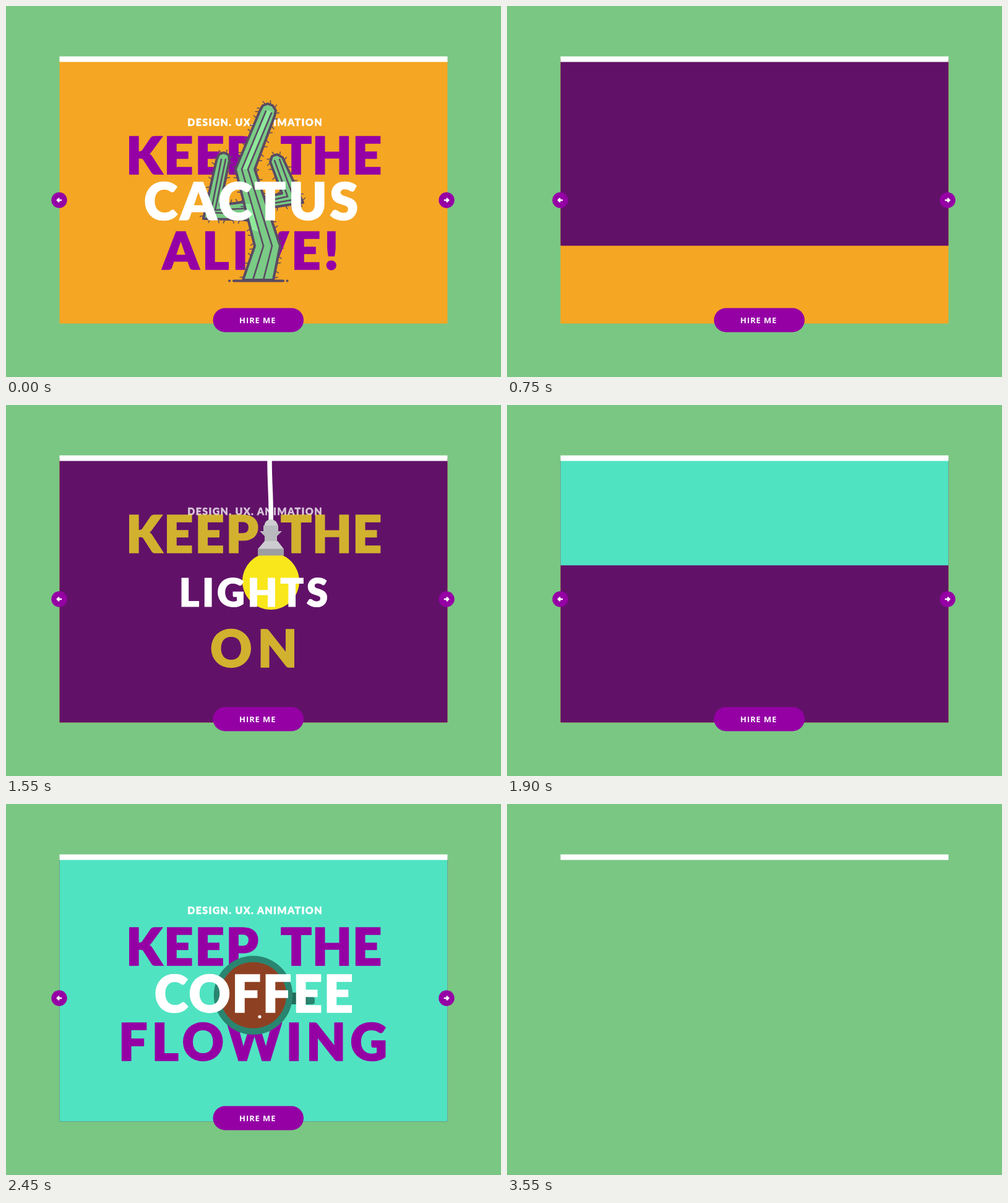
Recreate the animation shown at these times as an HTML page. Size 800 by 600 pixels, loop 3600 ms.

```html
<!DOCTYPE html>
<html lang="en">
<head>
<meta charset="utf-8">
<title>Keep it alive</title>
<style>
html, body { margin: 0; width: 100%; height: 100%; overflow: hidden; background: #7ac783; }
svg { display: block; width: 100%; height: 100%; color: #fff; }
text { font-family: Lato, "Open Sans", sans-serif; font-weight: 900; text-anchor: middle; fill: currentColor; }
.big { font-size: 83px; stroke: currentColor; stroke-width: 1.6px; }
.sub { font-size: 16px; stroke: currentColor; stroke-width: .4px; }
.hire { font: 700 13px "Open Sans", sans-serif; }
.violet { color: #9500a5; }
.gold { color: #f8e71c; }
.line { fill: none; stroke: #5a4a63; stroke-linejoin: round; stroke-linecap: round; }
</style>
</head>
<body>
<svg viewBox="0 0 800 600">
  <clipPath id="below"><rect x="86" y="86" width="628" height="428"/></clipPath>
  <rect class="panel" x="86.5" y="86" width="627" fill="#f5a623"/>
  <rect class="panel" x="86.5" y="86" width="627" fill="#611268"/>
  <rect class="panel" x="86.5" y="86" width="627" fill="#50e3c2"/>
  <g id="scenes"></g>
  <rect x="86.5" y="81.5" width="627" height="9" fill="#fff"/>
  <g id="buttons"></g>
</svg>
<script>
const $ = s => document.querySelector(s);
const LOOP = 3600, STEP = 50;
const clamp = v => Math.max(0, Math.min(1, v));
const ramp = (t, from, to) => clamp((t - from) / (to - from));

const word = (s, x, y, gap, cls = "big") =>
  `<text class="${cls}" x="${x + gap / 2}" y="${y}" letter-spacing="${gap}">${s}</text>`;
const line = (d, w) => `<path class="line" d="${d}" stroke-width="${w}"/>`;

// Short spines along the outer side of a clockwise outline
function spines(pts) {
  let d = "";
  for (let i = 1; i < pts.length; i++) {
    const [x, y] = pts[i - 1], dx = pts[i][0] - x, dy = pts[i][1] - y, len = Math.hypot(dx, dy);
    for (let s = 5, k = 0; s < len; s += 12, k++) {
      const lean = k % 2 ? 2.5 : -2.5, ux = dx / len, uy = dy / len;
      d += `M${x + ux * s} ${y + uy * s}l${uy * 6 + ux * lean} ${-ux * 6 + uy * lean}`;
    }
  }
  return line(d, 1.5);
}

function limb(outline, ribs, shine = "") {
  const pts = outline.split(" ").map(p => p.split(",").map(Number));
  return spines(pts) +
    `<path class="line" style="fill:#7acb85" d="M${outline}Z" stroke-width="4"/>` +
    `<path d="${shine}" fill="#8ee89a"/>` + line(ribs, 2.6);
}

const cactus =
  limb("395,346 319,344 340,250 344,240 352,237 360,241 361,250 346,322 392,316",
    "M348 248L331 334L395 337M355 248L338 330L395 327") +
  limb("405,312 446,303 427,252 430,243 438,240 447,245 480,318 415,328",
    "M434 250L455 308L415 317M442 248L466 313L415 322") +
  limb("383,443 402,388 371,264 410,170 415,161 423,158 431,161 436,169 434,178 402,264 443,388 432,443",
    "M420 170L381 264L416 388L399 443M429 173L391 264L430 388L416 443",
    "M420 168L430 171L391 264L381 264ZM387 320L397 320L410 366L398 362Z") +
  line("M368 444.5H448M361 444.5h.1M454.5 444.5h.1", 4);

const bulb = `
  <path d="M425 -200L426 90C426 130 429 150 428 190" fill="none" stroke="#fff" stroke-width="7.5"/>
  <circle cx="428" cy="285" r="46" fill="#f9e71c"/>
  <path d="M417 196Q419 185 428 185Q437 185 440 196Z" fill="#cdcdd0"/>
  <path d="M416 195H440V204H446L438 212V221H418V212L410 204H416Z" fill="#b9babd"/>
  <path d="M418 220H439L449 233H407Z" fill="#cdcdd0"/>
  <path d="M407 232.5H449V243.5H407Z" fill="#9d9ea1"/>`;

const cup = `
  <rect x="455" y="305" width="36" height="19" fill="#216b5a"/>
  <rect x="486" y="312" width="13" height="12" rx="4" fill="#2a8570"/>
  <circle cx="399.5" cy="309.3" r="63.7" fill="#2a8570"/>
  <circle cx="399.5" cy="309.3" r="53.5" fill="#8e4122"/>
  <circle cx="424" cy="324.5" r="3" fill="#fff"/>
  <circle cx="410" cy="344" r="2.6" fill="#fff"/>`;

// enter/dur: arrival, leave: start of departure; sub, top, mid, low are baselines
const scenes = [
  { enter: -900, dur: 300, leave: 400, hue: "violet", sub: 193.5, top: 272, mid: 345.5, low: 425.5,
    name: ["CACTUS", 396, 4.4], end: ["ALIVE!", 395.5, 5.2], art: cactus, pivot: [400, 301] },
  { enter: 850, dur: 300, leave: 1500, hue: "gold", sub: 177.5, top: 246, mid: 333, low: 413,
    name: ["LIGHTS", 400, 6], end: ["ON", 400.5, 9], art: bulb },
  { enter: 2100, dur: 350, leave: 3100, hue: "violet", sub: 177.5, top: 260.5, mid: 337, low: 414.5,
    name: ["COFFEE", 400.5, 2.3], end: ["FLOWING", 399, 6.8], art: cup, pivot: [417, 309] }
];

$("#scenes").innerHTML = scenes.map(s => `<g>
  <g>${word("DESIGN. UX. ANIMATION", 402, s.sub, 1.3, "sub")}</g>
  <g class="${s.hue}">${word("KEEP", 301, s.top, 2.5)}${word("THE", 525.5, s.top, 0.5)}</g>
  <g class="${s.hue}">${word(s.end[0], s.end[1], s.low, s.end[2])}</g>
  <g ${s.pivot ? "" : 'clip-path="url(#below)"'}><g>${s.art}</g></g>
  <g>${word(s.name[0], s.name[1], s.mid, s.name[2])}</g></g>`).join("");
scenes.forEach((s, i) => {
  s.el = $("#scenes").children[i];
  s.parts = [...s.el.children];
});

const arrow = (x, dir) => `<g data-c="${x},314"><circle cx="${x}" cy="314" r="12.7" fill="#9500a5"/>
  <path transform="translate(${x} 314) scale(${dir} 1)" d="M-4.2 0H2.5M0 -3.2L3.1 0L0 3.2"
    fill="none" stroke="#fff" stroke-width="2.5"/></g>`;
$("#buttons").innerHTML = arrow(86, -1) + arrow(712, 1) + `<g data-c="407.7,508">
  <rect x="334.5" y="488.5" width="146.5" height="39" rx="19.5" fill="#9500a5"/>
  ${word("HIRE ME", 406.3, 512.5, 0.9, "hire")}</g>`;
const buttons = [...$("#buttons").children];
const panels = [...document.querySelectorAll(".panel")];

const scaleAt = (el, k, x, y, dy = 0) =>
  el.setAttribute("transform", `translate(${x} ${y + dy}) scale(${k}) translate(${-x} ${-y})`);

function drawScene(s, t) {
  const out = ramp(t, s.leave, s.leave + 200), at = (t - s.enter) / s.dur;
  const bulbUp = ramp(t, 1550, 1700) ** 2;
  s.el.style.display = at >= 0 && (out < 1 || (!s.pivot && bulbUp < 1)) ? "" : "none";
  const [sub, top, low, art, name] = s.parts;
  const settle = clamp(at), pop = ramp(at, 0.4, 0.9) * (1 - out);
  const size = 0.9 + 0.1 * settle, gap = 22 * (1 - settle);
  sub.style.opacity = ramp(at, 0.55, 1) * (1 - out);
  top.style.opacity = low.style.opacity = 1 - out;
  scaleAt(top, size, 400, s.top - 30, -gap - 30 * out);
  scaleAt(low, size, 400, s.low - 30, gap + 42 * out);
  scaleAt(name, pop, 400, s.mid - 30);
  if (s.pivot) scaleAt(art, pop, ...s.pivot);
  else {
    const drop = 1 - (1 - ramp(t, 850, 950)) ** 2;
    art.firstChild.setAttribute("transform", `translate(0 ${-250 * (1 - drop + bulbUp)})`);
  }
}

function draw(now) {
  const t = Math.floor((now % LOOP) / STEP) * STEP;
  const open = 1 - ramp(t, 3217, 3550);
  const grown = [1, ramp(t, 515, 848), ramp(t, 1765, 2098)];
  panels.forEach((p, i) => p.setAttribute("height", 427.5 * grown[i] * open));
  scenes.forEach(s => drawScene(s, t));
  buttons.forEach(b => scaleAt(b, 1 - ramp(t, 3350, 3550), ...b.dataset.c.split(",").map(Number)));
}

let start;
function tick(now) {
  start ??= now;
  draw(now - start);
  requestAnimationFrame(tick);
}
draw(0);
requestAnimationFrame(tick);
</script>
</body>
</html>
```
